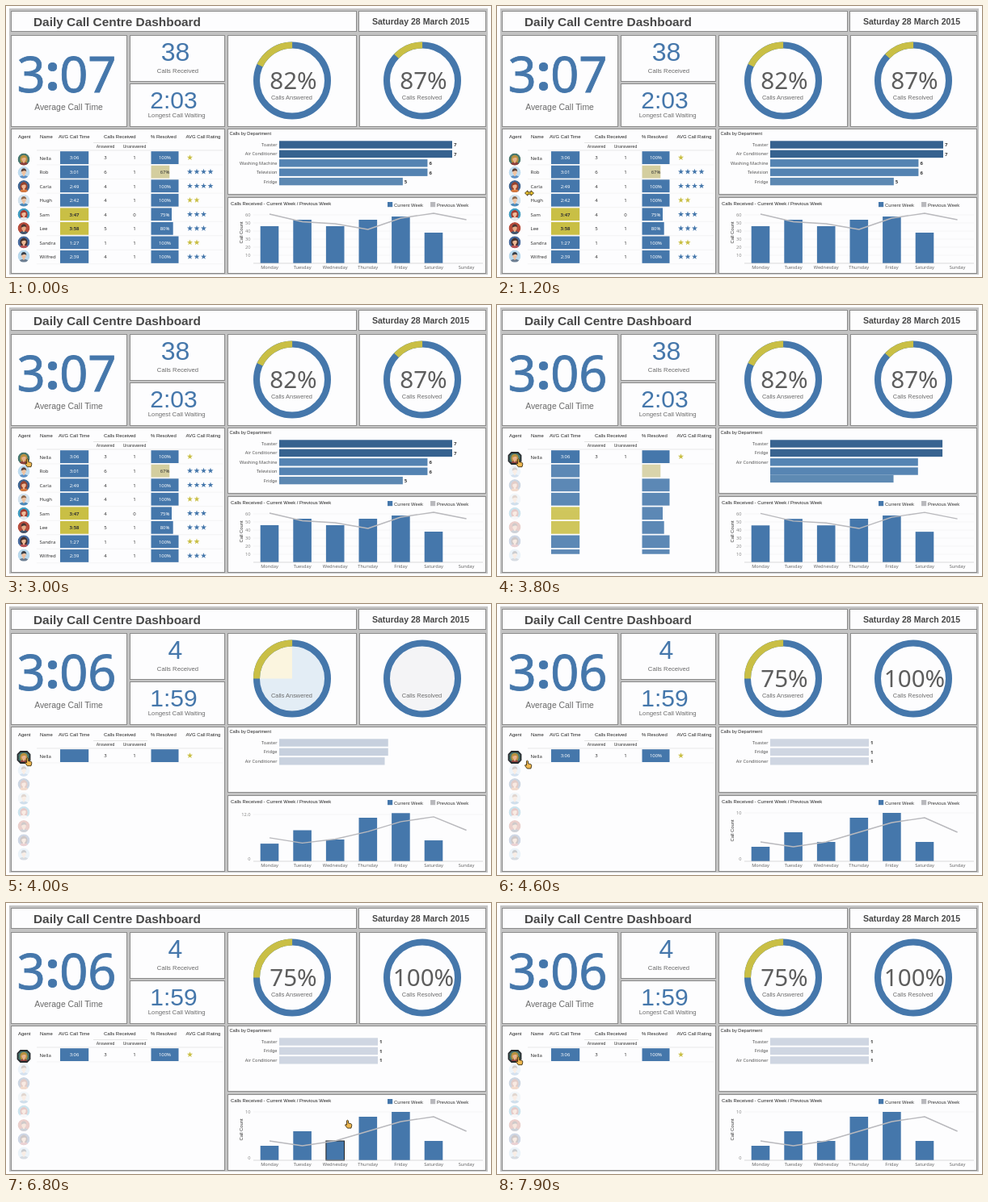
Write an HTML page that moves like this. It is 600 px wide and 336 px high and loops after 8 s.

```html
<!DOCTYPE html>
<html lang="en">
<head>
<meta charset="utf-8">
<title>Call centre dashboard</title>
<style>
  html, body { margin: 0; width: 100%; height: 100%; overflow: hidden; background: #fff; }
  svg { display: block; width: 600px; height: 336px; }
  text { font-family: "Liberation Sans", Arial, sans-serif; fill: #333; }
  .num { font-family: "Noto Sans", sans-serif; }
  .mid { text-anchor: middle; }
  .end { text-anchor: end; }
  .bold { font-weight: bold; }
</style>
</head>
<body>
<svg id="stage" viewBox="0 0 600 336"></svg>
<script>
const LOOP = 8000;
const BLUE = '#4577ab', YELLOW = '#c9bf45', GREY = '#6b6b6b', SILVER = '#b9b9bd', PALE = [207, 214, 226];
const stage = document.getElementById('stage');

const set = (node, attrs) => {
  for (const k in attrs) node.setAttribute(k, attrs[k]);
  return node;
};
const add = (parent, tag, attrs) =>
  parent.appendChild(set(document.createElementNS('http://www.w3.org/2000/svg', tag), attrs || {}));
const box = (parent, x, y, width, height, fill, more) =>
  add(parent, 'rect', { x, y, width, height, fill, ...more });
const line = (parent, x1, y1, x2, y2, stroke, w = 0.6) =>
  add(parent, 'line', { x1, y1, x2, y2, stroke, 'stroke-width': w });
const label = (parent, s, x, y, size, cls = '', fill = '#333') => {
  const node = add(parent, 'text', { x, y, 'font-size': size, class: cls, style: `fill:${fill}` });
  node.textContent = s;
  return node;
};
const write = (node, s) => { if (node.textContent !== s) node.textContent = s; };
const show = (node, on) => set(node, { display: on ? 'inline' : 'none' });
const clamp = v => Math.max(0, Math.min(1, v));
const span = (t, a, b) => clamp((t - a) / (b - a));
const ease = u => u < 0.5 ? 2 * u * u : 1 - 2 * (1 - u) * (1 - u);
const mix = (a, b, p) => a + (b - a) * p;
const blend = (a, b, p) => `rgb(${a.map((v, i) => Math.round(mix(v, b[i], p)))})`;

// Panels
box(stage, 4, 3, 592, 330, '#c3c3c3');
[[7, 7, 426, 24], [437, 7, 156, 24], [7, 37, 142, 112], [154, 37, 116, 56], [154, 97, 116, 52],
 [275, 37, 158, 112], [438, 37, 155, 112], [7, 153, 263, 178], [275, 153, 318, 80], [275, 238, 318, 93]]
  .forEach(([x, y, w, h]) => box(stage, x - 0.5, y - 0.5, w + 1, h + 1, '#fdfdfe',
    { stroke: '#8b8b8b', 'stroke-width': 1 }));

label(stage, 'Daily Call Centre Dashboard', 34, 24.5, 15.4, 'bold', '#474747');
label(stage, 'Saturday 28 March 2015', 513, 23, 10.55, 'bold mid', '#474747');

// Headline numbers
const average = label(stage, '', 75, 107, 61.5, 'num mid', BLUE);
set(average, { stroke: BLUE, 'stroke-width': 0.8 });
const [, colon, minutes] = ['3', ':', ''].map(s => {
  const part = add(average, 'tspan');
  part.textContent = s;
  return part;
});
set(colon, { dy: -3, class: 'bold' });
set(minutes, { dy: 3 });
const received = label(stage, '', 209.5, 68, 32, 'mid', BLUE);
const waiting = label(stage, '', 207.5, 126.5, 30, 'mid', BLUE);
label(stage, 'Average Call Time', 77.5, 129, 10.4, 'mid', GREY);
label(stage, 'Calls Received', 212.5, 82.5, 7.7, 'mid', GREY);
label(stage, 'Longest Call Waiting', 211.2, 138, 7.75, 'mid', GREY);

// Rings
function makeRing(cx, caption, before, after) {
  const cy = 92.5, r = 44, around = 2 * Math.PI * r;
  const tint = add(stage, 'g');
  add(tint, 'circle', { cx, cy, r: 40, fill: after < 100 ? '#e3edf5' : '#f4f4f6' });
  if (after < 100) add(tint, 'path', { d: `M${cx} ${cy}h-40a40 40 0 0 1 40 -40z`, fill: '#fbf5df' });
  const base = { cx, cy, r, fill: 'none', 'stroke-width': 8 };
  add(stage, 'circle', { ...base, stroke: BLUE });
  const rest = add(stage, 'circle', { ...base, stroke: YELLOW });
  const value = label(stage, '', cx + 1.5, 103, 29.6, 'num mid', '#5d5d5d');
  label(stage, caption, cx - 0.5, 116, 7.4, 'mid', GREY);
  return t => {
    const pct = t < 3900 ? before : after;
    const part = 1 - pct / 100;
    set(rest, {
      'stroke-dasharray': `${part * around} ${around}`,
      transform: `rotate(${-90 - part * 360} ${cx} ${cy})`
    });
    show(rest, part > 0);
    write(value, pct + '%');
    show(value, t < 3850 || t >= 4300);
    set(tint, { opacity: t < 3850 ? 0 : 1 - span(t, 4050, 4350) });
  };
}
const rings = [makeRing(354, 'Calls Answered', 82, 75), makeRing(515, 'Calls Resolved', 87, 100)];

// Agent table
[['Agent', 15], ['Name', 42], ['AVG Call Time', 65], ['Calls Received', 121],
 ['% Resolved', 179], ['AVG Call Rating', 222.5]]
  .forEach(([s, x]) => label(stage, s, x, 164.4, 5.95, '', '#222'));
label(stage, 'Answered', 123, 176, 5.1, 'mid');
label(stage, 'Unanswered', 159, 176, 5.1, 'mid');
line(stage, 108, 169.5, 175, 169.5, '#d5d5d5');
line(stage, 38, 179, 268, 179, '#d9d9d9');

const defs = add(stage, 'defs');
add(add(defs, 'clipPath', { id: 'disc' }), 'circle', { r: 7.5 });
const shutter = box(add(defs, 'clipPath', { id: 'shutter' }), 60, 170, 200, 160);

function makeAvatar(y, [back, hair, skin, shirt, long]) {
  const g = add(stage, 'g', { transform: `translate(22 ${y})` });
  const art = add(g, 'g', { 'clip-path': 'url(#disc)' });
  add(art, 'circle', { r: 7.5, fill: back });
  if (long) add(art, 'ellipse', { cy: 0.3, rx: 4.6, ry: 5.6, fill: hair });
  add(art, 'ellipse', { cy: 7.2, rx: 5.8, ry: 3.6, fill: shirt });
  box(art, -1.1, 1.5, 2.2, 3, skin);
  add(art, 'ellipse', { cy: -0.6, rx: 2.7, ry: 3.4, fill: skin });
  add(art, 'path', { d: 'M-3.3 -.6C-3.6 -6.5 3.6 -6.5 3.3 -.6C2.4 -2.8 -1 -2.4 -3.3 -.6Z', fill: hair });
  return g;
}

// name, time, answered, unanswered, resolved %, stars, avatar colours
const agents = [
  ['Nella', '3:06', 3, 1, 100, 1, ['#47776f', '#b8913f', '#e8b08c', '#8c3f3a', 1]],
  ['Rob', '3:01', 6, 1, 67, 4, ['#bfdcf0', '#5a4038', '#f0c3a0', '#5c8fc4', 0]],
  ['Carla', '2:49', 4, 1, 100, 4, ['#3e6490', '#98422d', '#f0b592', '#d9783c', 1]],
  ['Hugh', '2:42', 4, 1, 100, 2, ['#d3e3ee', '#8b6649', '#efc3a2', '#4d89b9', 0]],
  ['Sam', '3:47', 4, 0, 75, 3, ['#3f9cc0', '#a53c30', '#efba97', '#e5e9ee', 1]],
  ['Lee', '3:58', 5, 1, 80, 3, ['#b64c3c', '#493633', '#e5ad87', '#41566f', 0]],
  ['Sandra', '1:27', 1, 1, 100, 2, ['#486b9f', '#47302d', '#edb894', '#b95155', 1]],
  ['Wilfred', '2:39', 4, 1, 100, 3, ['#b9d9ed', '#3b4149', '#eec09f', '#6b7c90', 0]]
];
const starPath = Array.from({ length: 10 }, (_, i) => {
  const r = i % 2 ? 1.5 : 3.7, a = i * Math.PI / 5;
  return `${i ? 'L' : 'M'}${(r * Math.sin(a)).toFixed(2)} ${(-r * Math.cos(a)).toFixed(2)}`;
}).join('') + 'Z';

const rows = agents.map(([name, time, answered, missed, pct, stars, look], i) => {
  const y = 188.2 + i * 17.55;
  const bars = add(stage, 'g', i ? { 'clip-path': 'url(#shutter)' } : {}), words = add(stage, 'g');
  const slow = i === 4 || i === 5, low = pct < 70;
  line(words, 38, y + 8.8, 268, y + 8.8, '#ececec');
  box(bars, 67, y - 8, 35.2, 15.8, slow ? YELLOW : BLUE);
  box(bars, 179.5, y - 8, pct * 0.34, 15.8, low ? '#d4ce9f' : BLUE);
  label(words, name, 41.5, y + 2.3, 6, 'num');
  label(words, answered, 123, y + 2.2, 6, 'num mid');
  label(words, missed, 159, y + 2.2, 6, 'num mid');
  const clock = label(words, time, 84.5, y + 2.2, 5.9, 'num mid' + (slow ? ' bold' : ''), slow ? '#333' : '#fff');
  const share = label(words, pct + '%', 196.5, y + 2.2, 5.9, 'num mid', low ? '#333' : '#fff');
  for (let k = 0; k < stars; k++)
    add(words, 'path', { d: starPath, transform: `translate(${227.5 + k * 8.5} ${y - 0.2})`, fill: stars < 3 ? YELLOW : BLUE });
  return { bars, words, clock, share, face: makeAvatar(i ? 189 + i * 17.3 : 190, look) };
});
const picked = add(stage, 'path', {
  d: 'M18 183h8l3.5 3.5v7l-3.5 3.5h-8l-3.5 -3.5v-7z', fill: 'none', stroke: '#23282c', 'stroke-width': 1.8
});

function drawTable(t, p) {
  const closing = t >= 3700;
  const gone = (closing ? 0.88 : 1) * clamp(1 - p * 1.2), faded = mix(1, 0.25, span(t, 3600, 3800));
  set(shutter, { height: closing ? 140 * (1 - p) : 160 });
  rows.slice(1).forEach(row => {
    show(row.words, !closing);
    set(row.bars, { opacity: gone });
    set(row.face, { opacity: faded });
  });
  show(rows[0].clock, t < 3900 || t >= 4300);
  show(rows[0].share, !closing || t >= 4300);
  show(picked, t >= 3600);
}

// Departments: value before, name before and after
label(stage, 'Calls by Department', 276.5, 160.3, 5.7, '', '#222');
const shades = { 7: [54, 98, 143], 6: [84, 131, 178], 5: [92, 136, 178] };
const departments = [[7, 'Toaster', 'Toaster'], [7, 'Air Conditioner', 'Fridge'],
  [6, 'Washing Machine', 'Air Conditioner'], [6, 'Television', ''], [5, 'Fridge', '']]
  .map(([value, before, after], i) => {
    const y = 167.3 + i * 11.4;
    return {
      value, before, after, y,
      bar: box(stage, 338, y, 10, 9.4, BLUE),
      name: label(stage, '', 335.5, y + 6.6, 5.6, 'num end', '#555'),
      count: label(stage, '', 0, y + 7, 6, 'num bold')
    };
  });

function drawDepartments(t, p) {
  departments.forEach((d, i) => {
    const stays = i < 3;
    const w = mix(d.value * 30.57, 122, p);
    set(d.bar, {
      width: w, fill: blend(shades[d.value], PALE, clamp(p * 1.1)),
      y: d.y - (stays ? 0 : (i === 4 && t >= 3700 ? 2 : 0) + 18 * p),
      opacity: stays ? 1 : clamp(1 - p * 1.2)
    });
    write(d.name, t < 3700 ? d.before : d.after);
    write(d.count, t < 3700 ? String(d.value) : '1');
    set(d.count, { x: 340 + w });
    show(d.count, t < 3700 || (t >= 4300 && stays));
  });
}

// Weekly chart
label(stage, 'Calls Received - Current Week / Previous Week', 278, 246.5, 5.85, '', '#222');
[[472, BLUE, 'Current Week'], [525, SILVER, 'Previous Week']].forEach(([x, fill, s]) => {
  box(stage, x, 243, 6.2, 6.2, fill);
  label(stage, s, x + 8, 248.5, 5.85);
});
const axisName = label(stage, 'Call Count', 0, 0, 5.8, 'mid');
set(axisName, { transform: 'translate(293 281) rotate(-90)' });

// Axis states: pixel height and text of each tick
const FLOOR = 319;
const axes = [
  [10, 20, 30, 40, 50, 60].map(h => [h, h]),
  [[0, '0'], [58, '12.0']],
  [[0, '0'], [60, '10']]
].map(ticks => {
  const g = add(stage, 'g');
  ticks.forEach(([h, s]) => {
    if (h) line(g, 306, FLOOR - h, 590, FLOOR - h, '#eeeeef');
    label(g, s, 302.5, FLOOR - h + (h ? 2 : -1.5), 5.7, 'num end', '#888');
  });
  return g;
});
// day, calls then previous week for everyone, then for the chosen agent
const days = [['Monday', 46, 61, 3, 4], ['Tuesday', 54, 51.5, 6, 3], ['Wednesday', 46, 49, 4, 4],
  ['Thursday', 54, 42, 9, 6], ['Friday', 58, 56, 10, 8], ['Saturday', 38, 62, 4, 9], ['Sunday', 0, 54, 0, 6]]
  .map(([day, ...v], i) => {
    const x = 326 + i * 40.6;
    label(stage, day, x, 326.3, 5.7, 'num mid', '#666');
    return { x, v, bar: box(stage, x - 11.3, FLOOR, 22.6, 0, BLUE) };
  });
line(stage, 306, FLOOR, 590, FLOOR, '#c9c9c9', 0.7);
const trend = add(stage, 'polyline', { fill: 'none', stroke: SILVER, 'stroke-width': 1.4, 'stroke-linejoin': 'round' });

function drawChart(t, p, pointer) {
  const points = days.map(({ x, v, bar }) => {
    const h = mix(v[0], v[2] * 6, p);
    const hot = t > 5000 && pointer.y > 262 && Math.abs(pointer.x - x) < 20.3;
    set(bar, { y: FLOOR - h, height: h, stroke: hot && h ? '#222' : 'none', 'stroke-width': 1 });
    return `${x},${FLOOR - mix(v[1], v[3] * 6, p)}`;
  });
  set(trend, { points: points.join(' ') });
  const phase = t < 3850 ? 0 : t < 4300 ? 1 : 2;
  axes.forEach((g, k) => show(g, k === phase));
  show(axisName, phase !== 1);
}

// Pointer: time, x, y
const route = [[1000, 96, 312], [1200, 40, 232], [1500, 28, 196], [4500, 28, 196], [5300, 370, 300],
  [5600, 386, 308], [6200, 437, 277], [6700, 437, 277], [7500, 28, 196], [LOOP, 28, 196]];
const ink = { stroke: '#3a2d10', 'stroke-width': 0.9, 'stroke-linejoin': 'round' };
const sizer = add(stage, 'path', { d: 'M-5.5 0l3.5 -3.2v2h4v-2L5.5 0L2 3.2v-2h-4v2z', fill: '#efc62e', ...ink });
const hand = add(stage, 'path', {
  d: 'M-2.4 -4.6q1.2 -1.2 2 .2v3l2.6 .5q1.9 .4 1.6 2.2l-.8 3.4h-4.6l-2.8 -3.6q-.2 -1.6 2 -.4z', fill: '#efb851', ...ink
});

function pointerAt(t) {
  const i = Math.max(1, route.findIndex(r => t <= r[0]));
  const [a, x, y] = route[i - 1], [b, x2, y2] = route[i];
  const u = ease(span(t, a, b));
  return { x: mix(x, x2, u), y: mix(y, y2, u) };
}

function draw(t) {
  const p = ease(span(t, 3780, 4080));
  const pointer = pointerAt(t);
  write(minutes, t < 3700 ? '07' : '06');
  write(received, t < 3900 ? '38' : '4');
  write(waiting, t < 3900 ? '2:03' : '1:59');
  rings.forEach(ring => ring(t));
  drawTable(t, p);
  drawDepartments(t, p);
  drawChart(t, p, pointer);
  const at = { transform: `translate(${pointer.x} ${pointer.y})` };
  show(set(sizer, at), t >= 1000 && t < 1300);
  show(set(hand, at), t >= 1300);
}

const begin = performance.now();
function tick() {
  draw((performance.now() - begin) % LOOP);
  requestAnimationFrame(tick);
}
tick();
</script>
</body>
</html>
```
